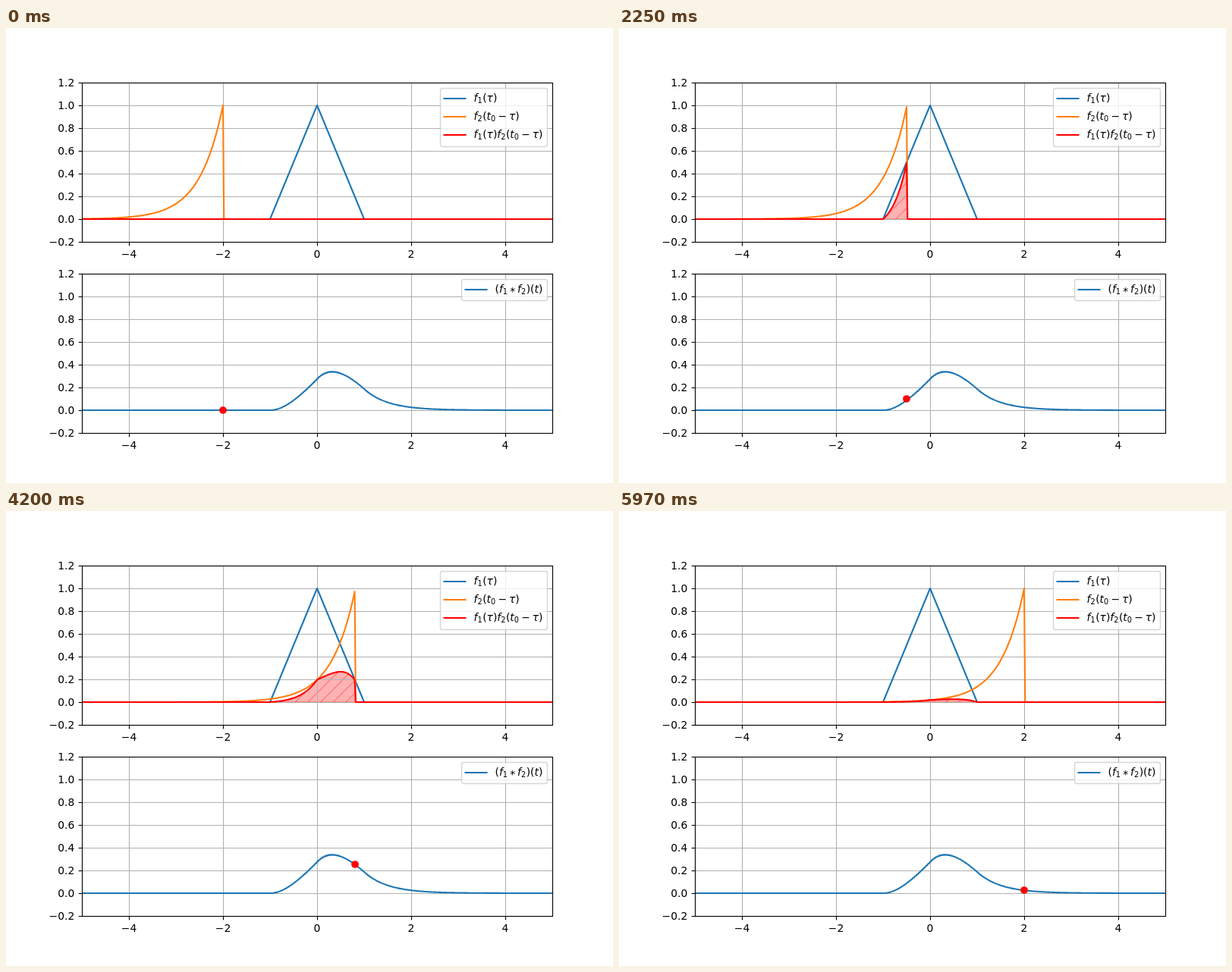
Animation of 800 by 600 pixels, one loop 6 s. Source, as an HTML page:

```html
<!DOCTYPE html>
<html lang="en">
<head>
<meta charset="utf-8">
<title>Convolution</title>
<style>
  html, body { margin: 0; width: 100%; height: 100%; overflow: hidden; background: #fff; }
  svg { display: block; width: 800px; height: 600px; }
  text { font: 13.889px "DejaVu Sans", sans-serif; fill: #000; white-space: pre; }
  .it { font-style: oblique; }
  .sub { font-size: 9.722px; }
  .grid { stroke: #b0b0b0; stroke-width: 1.11; }
  .axis { stroke: #000; stroke-width: 1.11; fill: none; }
  .line { fill: none; stroke-width: 2.083; stroke-linecap: square; stroke-linejoin: round; }
</style>
</head>
<body>
<svg id="stage" viewBox="0 0 800 600"></svg>
<script>
const BLUE = '#1f77b4', ORANGE = '#ff7f0e', RED = '#ff0000';
const LEFT = 100, RIGHT = 720, EM = 13.889;
const FRAMES = 200, STEP_MS = 30, DX = 0.02, EPS = 1e-9;
const stage = document.getElementById('stage');

function add(parent, tag, attrs, text) {
  const el = document.createElementNS('http://www.w3.org/2000/svg', tag);
  for (const key in attrs) el.setAttribute(key, attrs[key]);
  if (text !== undefined) el.textContent = text;
  parent.appendChild(el);
  return el;
}

// Signals on an evenly sampled axis
const tau = Array.from({ length: 500 }, (_, i) => (i - 250) * DX);
const triangle = x => Math.max(0, 1 - Math.abs(x));
const decay = (s, open) => (open ? s > EPS : s > -EPS) ? Math.exp(-2 * s) : 0;

// Simpson's rule; an open edge leaves out the sample at the jump
function convolve(t, open) {
  let sum = 0;
  for (let i = 200; i <= 300; i++) {
    sum += triangle(tau[i]) * decay(t - tau[i], open) * (i % 2 ? 4 : 2);
  }
  return sum * DX / 3;
}

const px = x => 410 + 62 * x;
const py = (y, zero) => zero - 150 * y;
const trace = (values, zero) => 'M' + values.map((v, i) =>
  px(tau[i]).toFixed(2) + ',' + py(v, zero).toFixed(2)).join('L');

// Axes: layers from back to front are fill, grid, curves, frame, legend
function makeAxes(top) {
  const zero = top + 180, bottom = top + 210;
  const clip = 'box' + top;
  add(add(stage, 'clipPath', { id: clip }), 'rect',
    { x: LEFT, y: top, width: RIGHT - LEFT, height: 210 });
  const clipped = { 'clip-path': `url(#${clip})` };
  const fill = add(stage, 'g', clipped);
  const grid = add(stage, 'g', { class: 'grid' });
  const curves = add(stage, 'g', clipped);
  const frame = add(stage, 'g', { class: 'axis' });

  for (let v = -4; v <= 4; v += 2) {
    const x = px(v) + 0.5;
    add(grid, 'path', { d: `M${x},${top}V${bottom}` });
    add(frame, 'path', { d: `M${x},${bottom + 0.5}v4.86` });
    add(stage, 'text', { x: px(v), y: bottom + 21, 'text-anchor': 'middle' },
      String(v).replace('-', '\u2212'));
  }
  for (let k = -1; k <= 6; k++) {
    const y = py(k / 5, zero);
    add(grid, 'path', { d: `M${LEFT},${y + 0.5}H${RIGHT}` });
    add(frame, 'path', { d: `M${LEFT + 0.5},${y + 0.5}h-4.86` });
    add(stage, 'text', { x: 90.3, y: y + 5, 'text-anchor': 'end' },
      (k / 5).toFixed(1).replace('-', '\u2212'));
  }
  add(frame, 'rect', { x: LEFT + 0.5, y: top + 0.5, width: RIGHT - LEFT, height: 210 });

  const curve = color => add(curves, 'path', { class: 'line', stroke: color });
  return { zero, fill, curves, curve };
}

// Formula setting: "_" marks a subscript, glyph advances are in em
const ADVANCE = { f: 0.352, t: 0.392, 'τ': 0.602, '(': 0.39, ')': 0.39,
  '\u2212': 0.838, '*': 0.5, ' ': 0.2 };

function formula(x, y, source) {
  const text = add(stage, 'text', {});
  let sub = false;
  for (const ch of source) {
    if (ch === '_') { sub = true; continue; }
    if (ch !== ' ') {
      const cls = sub ? 'sub' : 'ftτ'.includes(ch) ? 'it' : '';
      const drop = sub ? 2.2 : ch === '*' ? 2.6 : 0;
      add(text, 'tspan', { x: x.toFixed(2), y: y + drop, class: cls }, ch);
    }
    x += EM * (sub ? 0.636 * 0.7 + 0.04 : ADVANCE[ch]);
    sub = false;
  }
}

function legend(x, y, height, rows) {
  add(stage, 'rect', { x, y, width: 713.5 - x, height, rx: 2.78, fill: '#fff',
    stroke: '#ccc', 'stroke-width': 1.39, opacity: 0.8 });
  rows.forEach(([color, source], i) => {
    const mid = y + 13.5 + 24 * i;
    add(stage, 'path', { class: 'line', stroke: color, d: `M${x + 5},${mid}h28` });
    formula(x + 44, mid + 4, source);
  });
}

const upper = makeAxes(72);
const areaClip = add(add(stage, 'clipPath', { id: 'area' }), 'path', {});
const area = add(upper.fill, 'path', { fill: RED, 'fill-opacity': 0.3 });
let hatch = '';
for (let k = 24; k <= 50; k++) {
  const c = k * 100 / 6;
  hatch += `M${c - 60},60L${c - 290},290`;
}
add(upper.fill, 'path', { d: hatch, stroke: RED, 'stroke-opacity': 0.3,
  'stroke-width': 1.39, 'clip-path': 'url(#area)' });
const rim = add(upper.fill, 'path', { fill: 'none', stroke: RED,
  'stroke-opacity': 0.3, 'stroke-width': 1.39 });

upper.curve(BLUE).setAttribute('d', trace(tau.map(triangle), upper.zero));
const moving = upper.curve(ORANGE);
const product = upper.curve(RED);
legend(572.5, 79.5, 77, [
  [BLUE, 'f_1(τ)'],
  [ORANGE, 'f_2(t_0 \u2212 τ)'],
  [RED, 'f_1(τ)f_2(t_0 \u2212 τ)']
]);

const lower = makeAxes(324);
lower.curve(BLUE).setAttribute('d', trace(tau.map(t => convolve(t, true)), lower.zero));
const dot = add(lower.curves, 'circle', { r: 4.86, fill: RED });
legend(600.5, 331.5, 28, [[BLUE, '(f_1 * f_2)(t)']]);

function draw(step) {
  const t0 = -2 + 4 * step / (FRAMES - 1);
  const kernel = tau.map(x => decay(t0 - x));
  const line = trace(kernel.map((v, i) => v * triangle(tau[i])), upper.zero);
  const shape = line + `L${px(tau[tau.length - 1])},${upper.zero}H${px(tau[0])}Z`;
  moving.setAttribute('d', trace(kernel, upper.zero));
  product.setAttribute('d', line);
  for (const el of [area, areaClip, rim]) el.setAttribute('d', shape);
  dot.setAttribute('cx', Math.round(px(t0)));
  dot.setAttribute('cy', Math.round(py(convolve(t0), lower.zero)));
}

let shown = -1;
function tick() {
  const step = Math.floor(performance.now() / STEP_MS) % FRAMES;
  if (step !== shown) draw(shown = step);
  requestAnimationFrame(tick);
}
tick();
</script>
</body>
</html>
```
